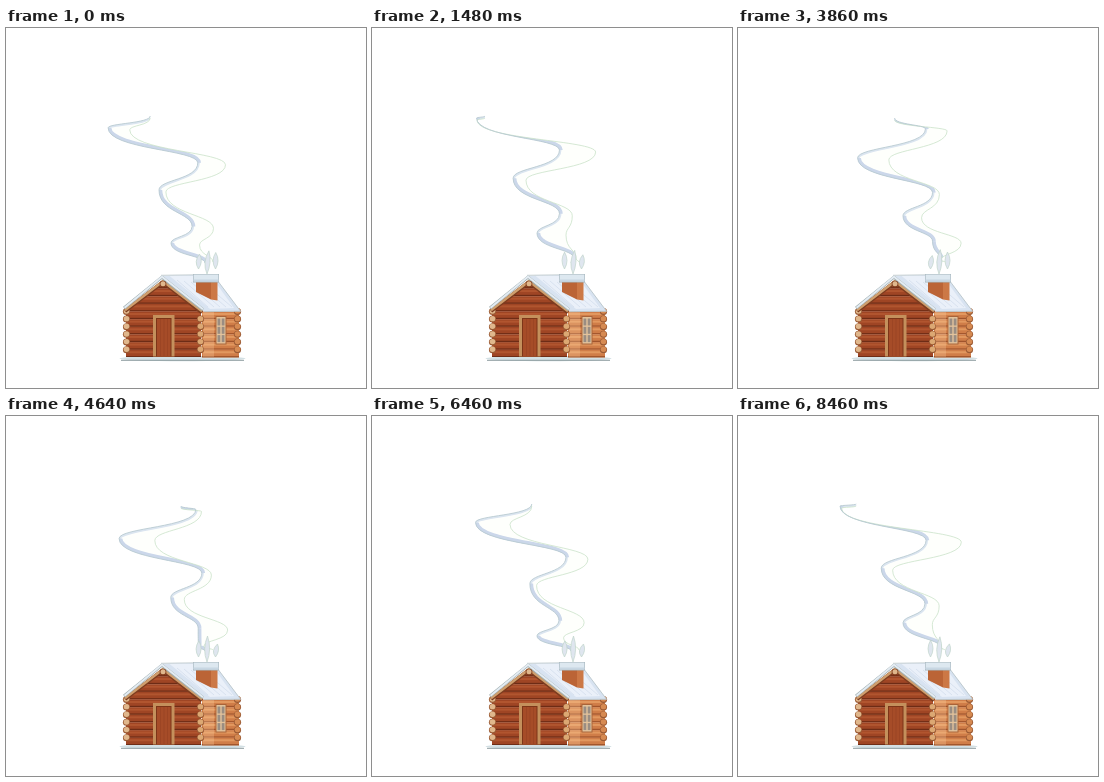
Recreate the animation shown at these times as an HTML page with a canvas. Size 360 by 360 pixels, loop 8630 ms.

```html
<!DOCTYPE html>
<html lang="en">
<head>
<meta charset="utf-8">
<title>Cabin smoke</title>
<style>
html, body { margin: 0; height: 100%; overflow: hidden; background: #fff; }
canvas { display: block; width: 100vw; height: 100vh; }
</style>
</head>
<body>
<canvas id="stage" width="360" height="360"></canvas>
<script>
const ctx = document.getElementById('stage').getContext('2d');
const LOOP = 8630, STEP = 119, LAST_STEP = 71, CYCLE = 60;
const CEILING = 90, FOOT = [203, 232], SLIDE = 2.6;

const wave = (t, period) => Math.cos(2 * Math.PI * t / period);
function smooth(from, to, value) {
  const t = Math.max(0, Math.min(1, (value - from) / (to - from)));
  return t * t * (3 - 2 * t);
}

// Bends grow out of the chimney, rise to the ceiling, then slide along it.
function grow(age, point) {
  const t = smooth(0, 20, age);
  return point.map((v, axis) => FOOT[axis] + (v - FOOT[axis]) * t);
}

// Width of the ribbon at a bend: pinched halfway up, closed at the ceiling.
const gap = age => (20 - (9 + age * 0.08) * wave(age - 55, 100)) * smooth(134, 112, age);

function leftBend(age) {
  const swing = 165 - 63 * smooth(36, 122, age);
  const x = Math.min(176, swing + SLIDE * Math.max(0, age - 131));
  const y = Math.max(CEILING, Math.min(224, 215 - 0.81 * age - 0.00125 * age * age));
  return { outer: grow(age + 28, [x, y]), inner: grow(age + 28, [x + gap(age), y + 2]) };
}

function rightBend(age) {
  const x = 191 - 5 * wave(Math.min(age, 162) - 62, 80) - SLIDE * Math.max(0, age - 162);
  const y = Math.max(CEILING, Math.min(220 - 0.15 * age, 264 - 1.06 * age));
  return { outer: grow(age - 8, [x + gap(age - 32), y]), inner: grow(age - 8, [x, y - 2]) };
}

// Both sides of the ribbon, from the tip down to the chimney.
function ribbonSides(phase) {
  const lower = [], upper = [];
  for (let age = phase + 3 * CYCLE; age > -CYCLE; age -= CYCLE) {
    if (age >= 8 && age <= 192) {
      const bend = rightBend(age);
      lower.push(bend.inner);
      upper.push(bend.outer);
    }
    const leftAge = age - CYCLE;
    if (leftAge >= -28 && leftAge <= 166) {
      const bend = leftBend(leftAge);
      lower.push(bend.outer);
      upper.push(bend.inner);
    }
  }
  lower.push([199, 235]);
  upper.push([207, 234]);
  return { lower, upper };
}

// Curve through points, upright at each; `pull` is how long it stays upright after one.
function curve(path, points, pull, joined) {
  points.forEach(([x, y], i) => {
    if (!i) return joined ? path.lineTo(x, y) : path.moveTo(x, y);
    const [px, py] = points[i - 1], mid = py + (y - py) * pull;
    path.bezierCurveTo(px, mid, x, mid, x, y);
  });
  return path;
}

function stroke(path, color, width) {
  ctx.strokeStyle = color;
  ctx.lineWidth = width;
  ctx.stroke(path);
}

function line(color, width, ...xy) {
  const path = new Path2D();
  for (let i = 0; i < xy.length; i += 2) path.lineTo(xy[i], xy[i + 1]);
  stroke(path, color, width);
}

function polygon(color, ...xy) {
  ctx.beginPath();
  for (let i = 0; i < xy.length; i += 2) ctx.lineTo(xy[i], xy[i + 1]);
  ctx.fillStyle = color;
  ctx.fill();
}

function rect(color, x, y, w, h) {
  ctx.fillStyle = color;
  ctx.fillRect(x, y, w, h);
}

function ellipse(color, x, y, rx, ry) {
  ctx.beginPath();
  ctx.ellipse(x, y, rx, ry, 0, 0, 7);
  ctx.fillStyle = color;
  ctx.fill();
}

function drawSmoke(phase) {
  const { lower, upper } = ribbonSides(phase);
  const lowerPath = curve(new Path2D(), lower, 0.62);
  const body = curve(new Path2D(), lower, 0.62);
  curve(body, upper.slice().reverse(), 0.38, true);

  ctx.fillStyle = '#fefffc';
  ctx.fill(body);
  ctx.save();
  ctx.clip(body);
  stroke(lowerPath, '#dbe5f0', 4);
  lower.slice(1).forEach((point, i) => {
    const falling = point[0] > lower[i][0];
    if (falling) stroke(curve(new Path2D(), [lower[i], point], 0.62), '#cbd7ea', 6.5);
  });
  ctx.restore();
  stroke(curve(new Path2D(), upper, 0.62), '#cbe3ca', 0.8);
  stroke(lowerPath, '#b9cbd2', 0.9);
}

function drawWisps(phase) {
  for (let n = 0; n < 3; n++) {
    const x = 192.5 + n * 8.5, tall = n === 1 ? 5 : 0;
    const sway = Math.sin(2 * Math.PI * phase / 15 + n * 2);
    const tip = 226 - tall + sway * 2, bottom = 241 + tall, mid = (tip + bottom) / 2;
    const wisp = new Path2D();
    wisp.moveTo(x + 1 + sway, tip);
    wisp.quadraticCurveTo(x - 5, mid, x, bottom);
    wisp.quadraticCurveTo(x + 5, mid, x + 1 + sway, tip);
    ctx.fillStyle = '#dfe6ef';
    ctx.fill(wisp);
    stroke(wisp, '#c0d5cb', 0.7);
  }
}

const LOG = 7.65;
function drawLogs(x, right, top, rows, body, shadow, glow) {
  for (let n = 0; n < rows; n++) {
    const y = top + n * LOG;
    rect(body, x, y, right - x, LOG);
    rect(glow, x, y + 1.5, right - x, 2);
    rect(shadow, x, y + 6.3, right - x, 1.3);
  }
}

function drawLogEnds(x, first, color) {
  for (let n = first; n < 6; n++) {
    const y = 283 + n * LOG;
    ellipse('#9a5a34', x, y + 0.4, 3.6, 3.5);
    ellipse(color, x, y, 2.8, 2.7);
  }
}

function drawWalls() {
  drawLogs(196, 233, 283.5, 6, '#d07d48', '#a0542c', '#e2985f');
  rect('rgba(255, 214, 170, 0.25)', 197, 284, 11, 45);
  ctx.save();
  ctx.beginPath();
  ctx.moveTo(157, 252);
  ctx.lineTo(195, 283);
  ctx.lineTo(195, 329);
  ctx.lineTo(120, 329);
  ctx.lineTo(120, 282);
  ctx.clip();
  drawLogs(118, 197, 252.9, 10, '#9f4524', '#6d2c16', '#b1552f');
  ctx.restore();
  drawLogEnds(120.5, 0, '#e0b78c');
  drawLogEnds(194.5, 1, '#dca873');
  drawLogEnds(231.5, 0, '#d68a52');
}

function drawDoorAndWindow() {
  rect('#c4905c', 147, 287, 21.5, 41.5);
  rect('#7d3518', 150, 290, 15.5, 38.5);
  rect('#a64c28', 151, 291, 13.5, 37.5);
  for (let x = 154.5; x < 164; x += 3.5) line('#964222', 0.6, x, 291, x, 328);

  rect('#a8643a', 209.5, 288, 11, 28.5);
  rect('#e3c39c', 210.5, 289, 9, 26.5);
  for (let n = 0; n < 6; n++) {
    rect('#9a8d82', 211.5 + n % 2 * 4.2, 290.5 + Math.floor(n / 2) * 8.3, 2.8, 7);
  }
}

function drawRoof() {
  polygon('#d8e3f1', 154, 248, 207, 246.5, 235, 283.5, 198, 283.5, 158, 252);
  polygon('#eaf0f9', 163, 247.5, 205, 248, 228, 280, 204, 281);
  for (let n = 0; n < 5; n++) line('#d3deed', 0.8, 171 + n * 7, 252 + n, 202 + n * 6, 279);
  line('#b5c2c6', 0.8, 155, 247.3, 207, 246.6, 234.5, 283.2, 198, 283.7);
  line('#7d3c1f', 4, 119, 283, 157, 254, 196, 284.5);
  line('#cf9f6e', 2.4, 119, 282.2, 157, 253.2, 196, 283.3);
  line('#a3b1b3', 3, 118, 280, 156, 249.2, 197, 281.7);
  line('#e4ecf3', 2, 118.5, 279.7, 156, 248.8, 197, 281.2);
  ellipse('#834020', 157, 256, 3.4, 3.3);
  ellipse('#e0b78c', 157, 255.8, 2.5, 2.5);
}

function drawChimney() {
  polygon('#bb6436', 190, 252, 205, 252, 205, 271.5, 190, 264);
  polygon('#cc7846', 205, 252, 211.5, 252, 211.5, 272.5, 205, 271.5);
  rect('#a5b5bc', 187, 246, 26, 8.5);
  rect('#dde8f0', 187.6, 246.5, 24.8, 7);
  rect('#c8d7e3', 187.6, 251.5, 24.8, 2);
}

function drawGround() {
  ellipse('#d3e0e4', 176.5, 330.5, 63, 2.8);
  line('#8c9c9f', 1, 115, 332.3, 238, 332.3);
}

function draw() {
  const time = performance.now() % LOOP;
  const step = Math.min(LAST_STEP, Math.floor((time + 2) / STEP));
  // The first pose is held for two steps when the cycle comes round.
  const phase = step <= CYCLE ? step % CYCLE : step - CYCLE - 1;
  ctx.clearRect(0, 0, 360, 360);
  ctx.lineJoin = 'round';
  drawSmoke(phase);
  drawGround();
  drawWalls();
  drawDoorAndWindow();
  drawRoof();
  drawChimney();
  drawWisps(phase);
  requestAnimationFrame(draw);
}
draw();
</script>
</body>
</html>
```
